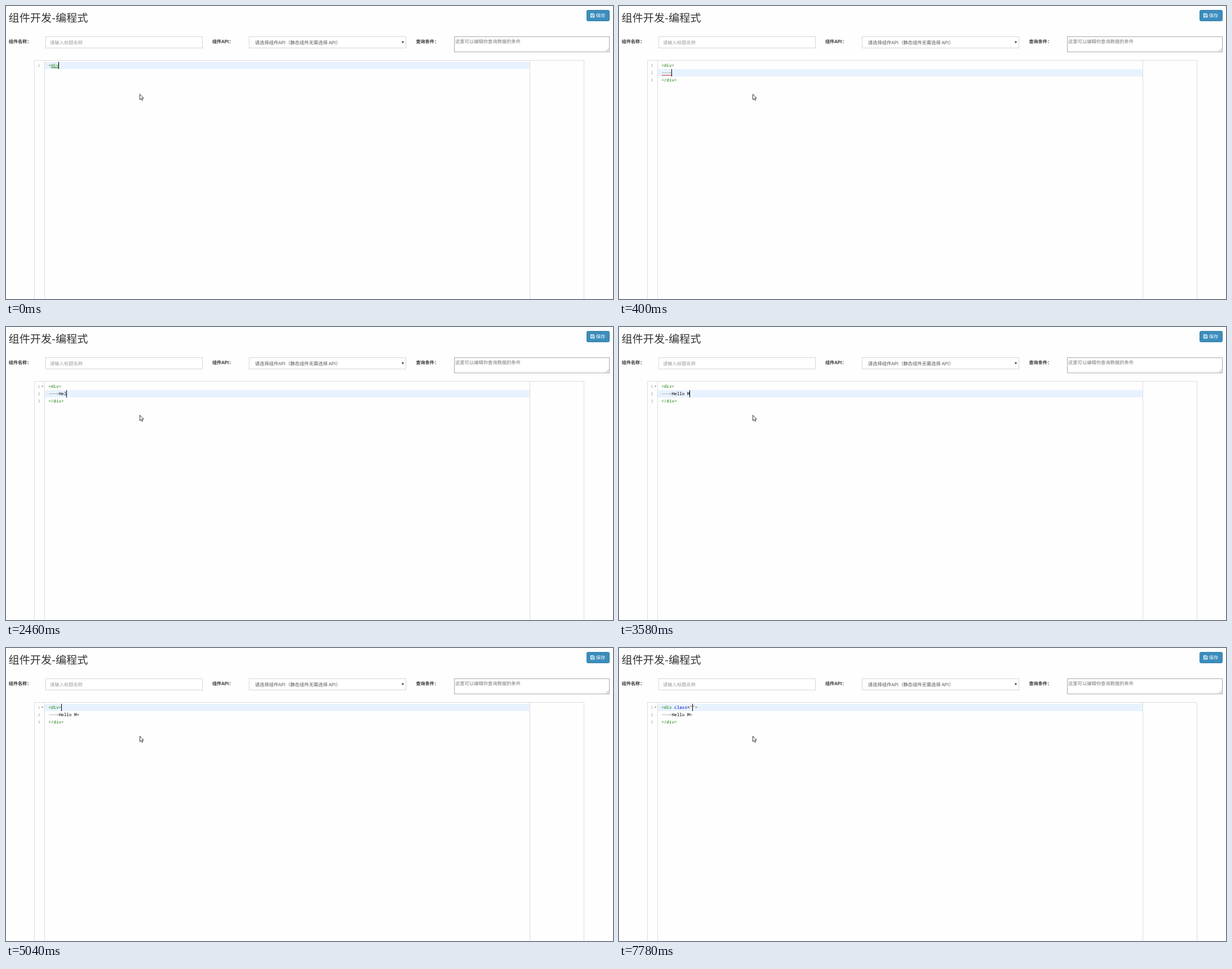
Recreate the animation shown at these times as an HTML page. Size 1077x520 px, loop 8 s.

```html
<!DOCTYPE html>
<html lang="zh-CN">
<head>
<meta charset="utf-8">
<style>
html, body { margin: 0; width: 100%; height: 100%; overflow: hidden; background: #fefefe; }
svg { display: block; }
text { font: 8.3px "Noto Sans CJK SC", "Noto Sans CJK", sans-serif; fill: #555; text-rendering: geometricPrecision; white-space: pre; }
.title { font-size: 19.2px; fill: #333; }
.label { font-size: 8.1px; font-weight: 700; fill: #333; }
.colon { font-family: "Noto Sans CJK JP", "Noto Sans CJK", sans-serif; }
.hint { fill: #999; }
.code { font: 7.633px "Noto Sans Mono", "DejaVu Sans Mono", monospace; fill: #000; }
.num { font-size: 6.7px; fill: #999; }
.tag { fill: #170; }
.attr { fill: #00c; }
.str { fill: #a11; }
.bad { fill: #f00; }
.box { fill: #fff; stroke: #d2d6de; }
.rule { stroke: #ddd; }
</style>
</head>
<body>
<svg width="1077" height="520" viewBox="0 0 1077 520">
  <text class="title" x="4.5" y="27.5">组件开发-编程式</text>

  <rect x="1030.5" y="7.5" width="40" height="19" rx="2" fill="#3c8dbc" stroke="#367fa9"/>
  <g fill="none" stroke="#fff">
    <path d="M1037.5 13.5h5l1.5 1.5v5h-6.500z"/>
    <path d="M1039 13.500v2.200h3v-2.200M1039 20v-2.300h3.500v2.300" stroke-width=".9"/>
  </g>
  <text x="1046.800" y="20" style="fill:#fff">保存</text>

  <text class="label" x="4.800" y="66">组件名称<tspan class="colon">：</tspan></text>
  <text class="label" x="366" y="66">组件API<tspan class="colon">：</tspan></text>
  <text class="label" x="727.500" y="66">查询条件<tspan class="colon">：</tspan></text>

  <rect class="box" x="70.500" y="54.500" width="278" height="20"/>
  <text class="hint" x="78" y="67.600">请输入标题名称</text>
  <rect class="box" x="431.500" y="54.500" width="278" height="20"/>
  <text x="441.800" y="68">请选择组件API（静态组件无需选择 API）</text>
  <path d="M702 62.800h4l-2 3.600z" fill="#333"/>
  <rect class="box" x="795.500" y="54.500" width="275" height="27" style="stroke:#a9a9a9"/>
  <text x="797" y="65.500" style="fill:#777">这里可以编辑你查询数据的条件</text>
  <path d="M1064.500 80.500l5-5M1067.500 80.500l2-2" stroke="#888" stroke-width=".8"/>

  <path class="rule" d="M50.500 520V96.500H1025.500V520" fill="none"/>
  <rect id="active" x="69" width="860" height="13" fill="#e8f2ff"/>
  <path class="rule" d="M68.500 97V520M929.500 97V520"/>

  <text class="code num" x="56.500" y="108">1</text>
  <path id="fold" d="M63 104.200h3.400l-1.700 2.600z" fill="#888"/>
  <text class="code" id="line1" x="75.200" y="108.300"></text>
  <path id="under" fill="none"/>
  <g id="rest">
    <text class="code num" x="56.500" y="121">2</text>
    <text class="code num" x="56.500" y="134">3</text>
    <path d="M76 118.500H92M90 116.700l2.500 1.800l-2.500 1.800" fill="none" stroke="#aaa" stroke-width=".8"/>
    <path id="wave" fill="none" stroke="#d00" stroke-width=".8"/>
    <text class="code" id="line2" x="93.520" y="121.300"></text>
    <text class="code" id="line3" x="75.200" y="134.300"></text>
  </g>
  <rect id="caret" width="1" height="13" fill="#000"/>
  <path d="M237.500 156.500v9.700l2.200-2 1.500 3.300 1.600-.7-1.500-3.200h2.900z" fill="#fff" stroke="#222" stroke-width=".9"/>
</svg>
<script>
const LOOP = 8000, LEFT = 75.2, CHAR = 4.58, TOP = 99, ROW = 13;
const $ = id => document.getElementById(id);
const span = (cls, s) => `<tspan class="${cls}">${s}</tspan>`;
const tag = s => span('tag', s.replace('<', '&lt;'));

// Each step: time, then the properties that change from that time on.
const steps = [
  [0, { name: '<div', attr: '', quotes: '', end: '', body: null, fold: 0, row: 0, col: 4, on: 1, under: [1, 4], bad: 0 }],
  [120, { on: 0 }],
  [400, { end: '>', body: '', row: 1, on: 1, under: null }],
  [680, { on: 0 }],
  [840, { fold: 1 }],
  [1300, { on: 1 }],
  [1910, { body: 'H', col: 5 }],
  [2190, { body: 'He', col: 6 }],
  [2460, { body: 'Hel', col: 7 }],
  [2610, { body: 'Hell', col: 8 }],
  [2740, { body: 'Hello', col: 9 }],
  [2880, { body: 'Hello ', col: 10 }],
  [3180, { body: 'Hello', col: 9 }],
  [3580, { body: 'Hello M', col: 11 }],
  [4040, { body: 'Hello ', col: 10 }],
  [4240, { body: 'Hello M', col: 11 }],
  [4450, { body: 'Hello M+', col: 12 }],
  [4760, { on: 0 }],
  [5040, { row: 0, col: 5, on: 1 }],
  [5340, { col: 4 }],
  [5600, { name: '<divc', col: 5, bad: 1 }],
  [5730, { name: '<div ', bad: 0 }],
  [5860, { attr: 'c', col: 6, under: [5, 6] }],
  [6260, { attr: 'cl', col: 7, under: [5, 7] }],
  [6560, { attr: 'cla', col: 8, under: [5, 8] }],
  [6690, { attr: 'clas', col: 9, under: [5, 9] }],
  [6820, { attr: 'class', col: 10, under: [5, 10] }],
  [6960, { under: null }],
  [7100, { quotes: '=', col: 11 }],
  [7510, { on: 0 }],
  [7780, { quotes: '=""', col: 12, on: 1 }]
];

let wave = 'M76 123.6';
for (let i = 0; i < 9; i++) wave += `l1 -1.200l1 1.200`;
$('wave').setAttribute('d', wave);

const show = (id, on) => $(id).setAttribute('visibility', on ? 'inherit' : 'hidden');

function draw(t) {
  const s = {};
  for (const [at, change] of steps) if (at <= t) Object.assign(s, change);

  $('line1').innerHTML = tag(s.name) + span('attr', s.attr) +
    s.quotes.slice(0, 1) + span('str', s.quotes.slice(1)) + tag(s.end);
  $('line2').textContent = s.body || '';
  $('line3').innerHTML = tag('</') + span(s.bad ? 'bad' : 'tag', 'div') + tag('>');
  show('rest', s.body !== null);
  show('wave', s.body === '');
  show('fold', s.fold);
  show('under', s.under);
  if (s.under) {
    const [a, b] = s.under.map(n => LEFT + n * CHAR);
    $('under').setAttribute('d', `M${a} 109.500H${b}`);
    $('under').setAttribute('stroke', s.attr ? '#00c' : '#170');
  }
  const y = TOP + s.row * ROW;
  $('active').setAttribute('y', y);
  $('caret').setAttribute('x', Math.floor(LEFT + s.col * CHAR));
  $('caret').setAttribute('y', y);
  show('caret', s.on);
}

const start = performance.now();
function tick() {
  draw((performance.now() - start) % LOOP);
  requestAnimationFrame(tick);
}
tick();
</script>
</body>
</html>
```
